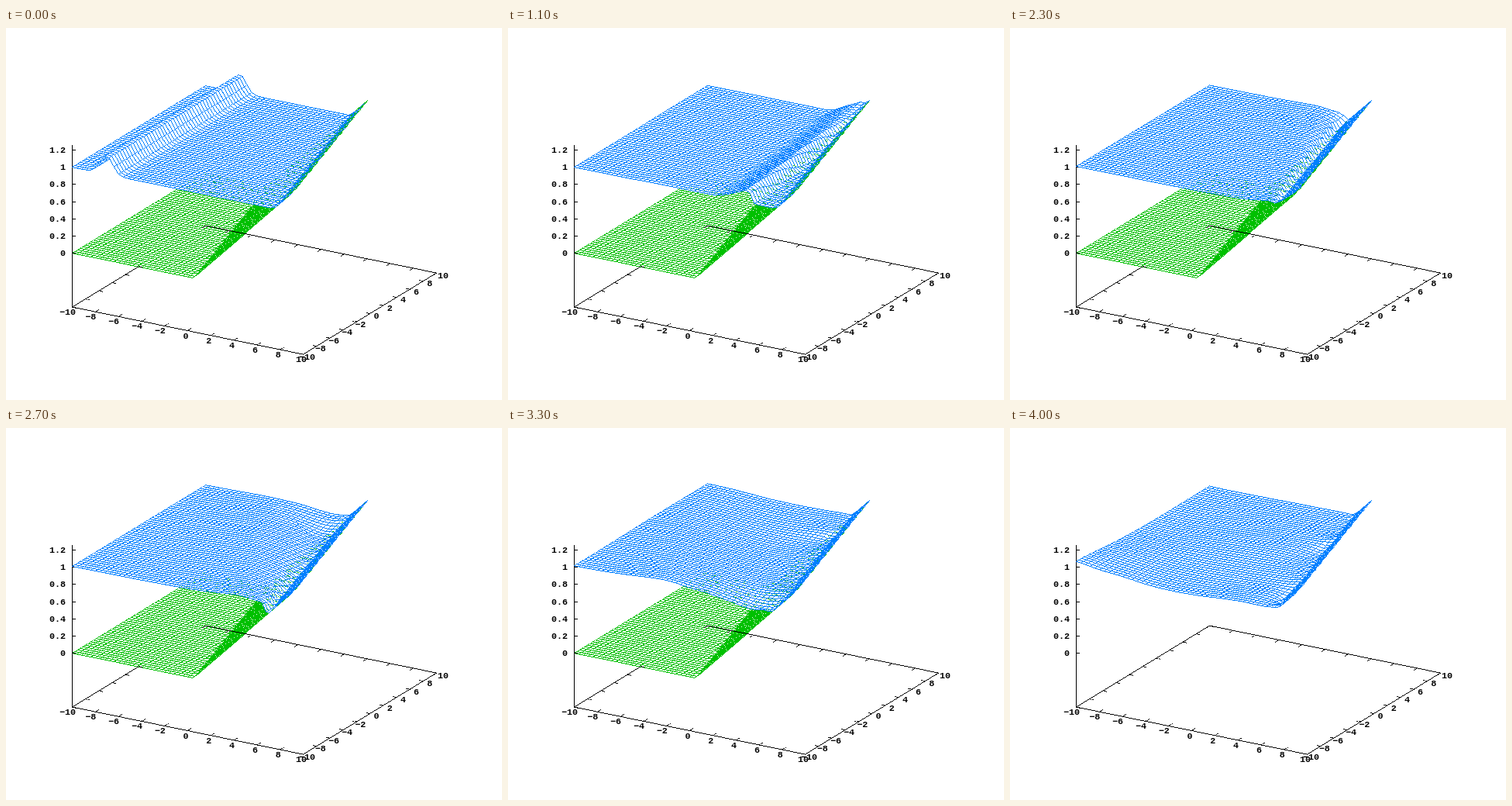
Animation of 640 by 480 pixels, one loop 4.1 s. Source, as an HTML page with a canvas:

```html
<!DOCTYPE html>
<html lang="en">
<head>
<meta charset="utf-8">
<title>Wave running up a sloping beach</title>
<style>
  html, body { margin: 0; width: 640px; height: 480px; overflow: hidden; background: #fff; }
  canvas, svg { position: absolute; left: 0; top: 0; display: block; }
  text { font: bold 11.7px "Liberation Mono", "DejaVu Sans Mono", monospace; text-anchor: middle; }
  .z text { text-anchor: end; }
</style>
</head>
<body>
<canvas id="plot" width="640" height="480"></canvas>
<svg id="labels" width="640" height="480"></svg>
<script>
const STEP = 100, FRAMES = 41;
const BLACK = 0xff000000, GREEN = 0xff00c000, BLUE = 0xffff8000, WHITE = 0xffffffff;
const FLOOR = -0.626, TOP = 1.25;

// Projection of the 3D box onto the stage
const px = (x, y) => 85 + (x + 10) * 14.9 + (y + 10) * 8.6;
const py = (x, y, z) => 290.1 + (x + 10) * 3.05 - (y + 10) * 5.25 - z * 111;
const bedAt = (x, y) => Math.max(0, (x + 0.25 * y + 2) / 7);

// ---- Shallow water solver (g = 1, one time unit per picture) ----
const NX = 101, NY = 51, DX = 0.2, DY = 0.4, SUB = 16, DRY = 0.002;
const grid = () => new Float64Array(NX * NY);
const depth = grid(), momX = grid(), momY = grid(), bed = grid();

for (let j = 0; j < NY; j++) for (let i = 0; i < NX; i++) {
  const x = -10 + i * DX, y = -10 + j * DY, k = j * NX + i, r = x + 7;
  bed[k] = bedAt(x, y);
  const bump = 0.215 * Math.exp(-(r < 0 ? 1.5 : 2) * r * r);
  depth[k] = Math.max(0, 1 + bump - bed[k]);
  momX[k] = depth[k] * 2 * (Math.sqrt(1 + bump) - 1);
}

const line = () => new Float64Array(NX + 4);
const [h, p, q, b, e, u, v] = Array.from({ length: 7 }, line);
const [hL, hR, zL, zR, uL, uR, vL, vR] = Array.from({ length: 8 }, line);
const [dh, dp, dq, h0, p0, q0] = Array.from({ length: 6 }, line);

function halfSlope(a, i) {
  const l = a[i] - a[i - 1], r = a[i + 1] - a[i];
  if (l * r <= 0) return 0;
  const s = Math.min(Math.abs(l), Math.abs(r), Math.abs(l + r) / 4);
  return l < 0 ? -s : s;
}

function ghost(to, from, sign) {
  h[to] = h[from]; b[to] = b[from]; q[to] = q[from]; p[to] = sign * p[from];
}

// Well-balanced second-order rates of change along one line of cells
function rates(n, d, open) {
  const s = open ? 1 : -1;
  ghost(1, 2, s); ghost(0, 3, s);
  ghost(n + 2, n + 1, -1); ghost(n + 3, n, -1);
  for (let i = 0; i < n + 4; i++) {
    const wet = h[i] > DRY;
    e[i] = h[i] + b[i];
    u[i] = wet ? p[i] / h[i] : 0;
    v[i] = wet ? q[i] / h[i] : 0;
  }
  for (let i = 1; i < n + 3; i++) {
    const sh = halfSlope(h, i), se = halfSlope(e, i), su = halfSlope(u, i), sv = halfSlope(v, i);
    hL[i] = h[i] - sh; hR[i] = h[i] + sh;
    zL[i] = e[i] - se - hL[i]; zR[i] = e[i] + se - hR[i];
    uL[i] = u[i] - su; uR[i] = u[i] + su;
    vL[i] = v[i] - sv; vR[i] = v[i] + sv;
    dh[i] = dq[i] = 0;
    dp[i] = -0.5 * (hL[i] + hR[i]) * (zR[i] - zL[i]) / d;
  }
  for (let i = 1; i < n + 2; i++) {
    const k = i + 1, z = Math.max(zR[i], zL[k]);
    const a = Math.max(0, hR[i] + zR[i] - z), c = Math.max(0, hL[k] + zL[k] - z);
    const ua = uR[i], uc = uL[k], ca = Math.sqrt(a), cc = Math.sqrt(c);
    const lo = Math.min(0, ua - ca, uc - cc), hi = Math.max(0, ua + ca, uc + cc);
    const span = Math.max(hi - lo, 1e-9), fa = a * ua, fc = c * uc;
    const hll = (f, g, jump) => (hi * f - lo * g + lo * hi * jump) / span;
    const fh = hll(fa, fc, c - a);
    const fp = hll(fa * ua + a * a / 2, fc * uc + c * c / 2, fc - fa);
    const fq = fh > 0 ? fh * vR[i] : fh * vL[k];
    dh[i] -= fh / d; dh[k] += fh / d;
    dq[i] -= fq / d; dq[k] += fq / d;
    dp[i] -= (fp + 0.5 * (hR[i] * hR[i] - a * a)) / d;
    dp[k] += (fp + 0.5 * (hL[k] * hL[k] - c * c)) / d;
  }
}

function sweep(n, start, stride, along, across, d, open) {
  const dt = 1 / SUB;
  for (let i = 2, k = start; i < n + 2; i++, k += stride) {
    h[i] = h0[i] = depth[k];
    p[i] = p0[i] = along[k];
    q[i] = q0[i] = across[k];
    b[i] = bed[k];
  }
  for (let stage = 0; stage < 2; stage++) {
    rates(n, d, open);
    for (let i = 2; i < n + 2; i++) {
      h[i] += dt * dh[i]; p[i] += dt * dp[i]; q[i] += dt * dq[i];
      if (stage) {
        h[i] = (h[i] + h0[i]) / 2; p[i] = (p[i] + p0[i]) / 2; q[i] = (q[i] + q0[i]) / 2;
      }
      if (h[i] < 0) h[i] = 0;
      if (h[i] < DRY) p[i] = q[i] = 0;
    }
  }
  for (let i = 2, k = start; i < n + 2; i++, k += stride) {
    depth[k] = h[i]; along[k] = p[i]; across[k] = q[i];
  }
}

const history = [depth.slice()];
function waterAt(n) {
  while (history.length <= n) {
    for (let s = 0; s < SUB; s++) {
      for (let j = 0; j < NY; j++) sweep(NX, j * NX, 1, momX, momY, DX, true);
      for (let i = 0; i < NX; i++) sweep(NY, i, NX, momY, momX, DY, false);
    }
    history.push(depth.slice());
  }
  return history[n];
}

// ---- Drawing with hard one-pixel lines ----
const ctx = document.getElementById("plot").getContext("2d");
const image = ctx.createImageData(640, 480);
const pix = new Uint32Array(image.data.buffer);

function stroke(x0, y0, x1, y1, color) {
  const n = Math.max(1, Math.round(Math.max(Math.abs(x1 - x0), Math.abs(y1 - y0))));
  for (let i = 0; i <= n; i++) {
    const x = Math.round(x0 + (x1 - x0) * i / n), y = Math.round(y0 + (y1 - y0) * i / n);
    pix[y * 640 + x] = color;
  }
}

function seg(x0, y0, z0, x1, y1, z1, color) {
  stroke(px(x0, y0), py(x0, y0, z0), px(x1, y1), py(x1, y1, z1), color);
}

// A few specks of the hidden bed stay visible through the water
const speck = k => (Math.imul(k, 2654435761) >>> 8) % 10 === 0;

function erase(A, B, C) {
  const side = (P, Q, x, y) => (Q.x - P.x) * (y - P.y) - (Q.y - P.y) * (x - P.x);
  const x1 = Math.max(A.x, B.x, C.x), y1 = Math.max(A.y, B.y, C.y);
  for (let y = Math.ceil(Math.min(A.y, B.y, C.y)); y <= y1; y++) {
    for (let x = Math.ceil(Math.min(A.x, B.x, C.x)); x <= x1; x++) {
      const s = side(A, B, x, y), t = side(B, C, x, y), w = side(C, A, x, y);
      const inside = (s >= 0 && t >= 0 && w >= 0) || (s <= 0 && t <= 0 && w <= 0);
      const k = y * 640 + x;
      if (inside && !(pix[k] === GREEN && speck(k))) pix[k] = WHITE;
    }
  }
}

// Cells go from far to near; bare cells get only some edges and hide nothing
function mesh(height, color, bare) {
  const C = 50;
  const point = (i, j) => {
    const x = -10 + i * 0.4, y = -10 + j * 0.4, z = height(i, j);
    return { x: px(x, y), y: py(x, y, z), z };
  };
  const edge = (P, Q) => stroke(P.x, P.y, Q.x, Q.y, color);
  for (let j = C - 1; j >= 0; j--) for (let i = 0; i < C; i++) {
    const P = point(i, j), Q = point(i + 1, j), R = point(i + 1, j + 1), S = point(i, j + 1);
    if (Math.max(P.z, Q.z, R.z, S.z) > TOP) continue;
    if (bare(i, j)) {
      if ((i + j) % 2) { edge(P, Q); edge(P, S); }
      continue;
    }
    erase(P, Q, R);
    erase(P, R, S);
    edge(P, Q); edge(Q, R); edge(R, S); edge(S, P);
  }
}

function axes(leftEnd) {
  const F = FLOOR;
  seg(-10, -10, F, 10, -10, F, BLACK);
  seg(10, -10, F, 10, 10, F, BLACK);
  seg(-10, 10, F, 10, 10, F, BLACK);
  seg(-10, -10, F, -10, leftEnd, F, BLACK);
  stroke(85, 151, 85, 360, BLACK);
  for (let t = -10; t <= 10; t += 2) {
    seg(t, -10, F, t, -9.5, F, BLACK);
    seg(t, 10, F, t, 9.5, F, BLACK);
    seg(10, t, F, 9.7, t, F, BLACK);
    if (t <= leftEnd) seg(-10, t, F, -9.7, t, F, BLACK);
  }
  for (let k = 0; k <= 6; k++) {
    const y = py(-10, -10, k / 5);
    stroke(85, y, 89, y, BLACK);
  }
}

function draw(n) {
  const water = waterAt(n), showBed = n < FRAMES - 1;
  const at = (i, j) => j * NX + i * 2;
  pix.fill(WHITE);
  if (showBed) mesh((i, j) => bed[at(i, j)], GREEN, () => false);
  axes(showBed ? 0 : 10);
  mesh((i, j) => bed[at(i, j)] + water[at(i, j)], BLUE,
    (i, j) => showBed && water[at(i, j)] < 1e-4);
  ctx.putImageData(image, 0, 0);
}

// ---- Axis labels ----
const label = (x, y, n) => `<text x="${x}" y="${y + 4}">${String(n).replace("-", "\u2212")}</text>`;
let zText = "", xyText = "";
for (let k = 0; k <= 6; k++) zText += label(77, py(-10, -10, k / 5), k / 5);
for (let t = -10; t <= 10; t += 2) {
  xyText += label(px(t, -10) - (t < 0 ? 5.5 : 2), py(t, -10, FLOOR) + 6.5, t);
  xyText += label(px(10, t) + (t < 0 ? 5.5 : 9), py(10, t, FLOOR) + 3, t);
}
document.getElementById("labels").innerHTML = `<g class="z">${zText}</g>${xyText}`;

let shown = -1;
const began = performance.now();
function tick() {
  const n = Math.floor((performance.now() - began) / STEP) % FRAMES;
  if (n !== shown) draw(shown = n);
  requestAnimationFrame(tick);
}
tick();
</script>
</body>
</html>
```
